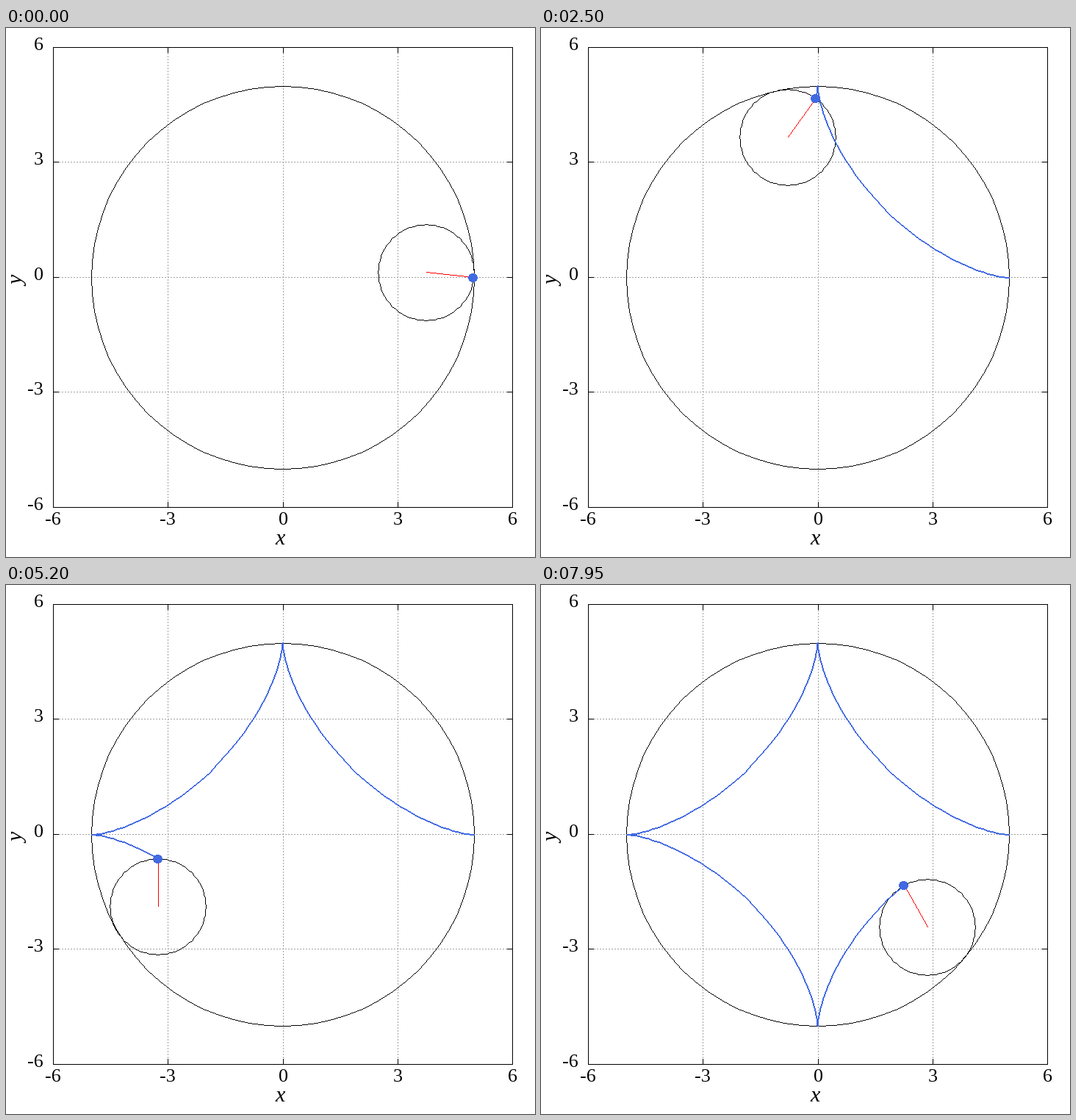
A matplotlib script for the animation above (8 s loop, 720 by 720 pixels).

```python
import numpy as np
import matplotlib.pyplot as plt
from matplotlib.animation import FuncAnimation
from matplotlib.collections import PolyCollection
from matplotlib.patches import Circle

SIZE = 720
FRAMES, INTERVAL = 160, 50
STEP = 2                      # degrees per frame
R_BIG, R_SMALL = 5.0, 1.25
ARM = R_BIG - R_SMALL
LEFT, TOP, RIGHT, BOTTOM = 64, 26, 689, 652
SX, SY = (RIGHT - LEFT) / 12, (BOTTOM - TOP) / 12
TICK = 7
BLUE = "#4169e1"
SQUARE = np.array([(0, 0), (1, 0), (1, 1), (0, 1)])
RIM = np.radians(np.arange(0, 361, 5))

fig = plt.figure(figsize=(SIZE / 72, SIZE / 72), dpi=72, facecolor="white")
ax = fig.add_axes([0, 0, 1, 1])
ax.set_xlim(0, SIZE)
ax.set_ylim(SIZE, 0)
ax.axis("off")


def to_px(x, y):
    """Nearest pixel of a data point."""
    px = np.floor(LEFT + (np.asarray(x) + 6) * SX + 0.5)
    py = np.ceil(BOTTOM - (np.asarray(y) + 6) * SY - 0.5)
    return px, py


def cells(x, y, thick=False):
    """Pixels along a polyline; thick ones are doubled across their run."""
    found = []
    for x1, y1, x2, y2 in zip(x, y, x[1:], y[1:]):
        dx, dy = abs(x2 - x1), abs(y2 - y1)
        n = int(max(dx, dy)) + 1
        run = np.column_stack([np.linspace(x1, x2, n), np.linspace(y1, y2, n)])
        run = np.floor(run + 0.5)
        found.append(run)
        if thick:
            found.append(run + ((0, 1) if dx > dy else (-1, 0)))
    return np.unique(np.concatenate(found), axis=0)


def squares(points):
    return points[:, None, :] + SQUARE


def rim(x, y, r):
    cx, cy = to_px(x, y)
    return squares(cells(np.floor(cx + r * SX * np.cos(RIM)),
                         np.ceil(cy - r * SX * np.sin(RIM))))


def pixel_art(color, zorder, verts=()):
    art = PolyCollection(verts, facecolors=color, edgecolors="none",
                         antialiaseds=False, zorder=zorder)
    ax.add_collection(art, autolim=False)
    return art


def rule(x1, y1, x2, y2):
    pixel_art("black", 2, squares(cells((x1, x2), (y1, y2))))


def dotted(x1, y1, x2, y2):
    run = cells((x1, x2), (y1, y2))
    on = np.arange(len(run)) % 4 < 2
    pixel_art("#a0a0a0", 1, squares(run[on]))


def label(x, y, text, size=26, ha="center", **kw):
    ax.text(x, y, text, family="Liberation Serif", fontsize=size, ha=ha,
            va="baseline", color="black", **kw)


def hypocycloid(deg):
    t = np.radians(deg)
    return (ARM * np.cos(t) + R_SMALL * np.cos(3 * t),
            ARM * np.sin(t) - R_SMALL * np.sin(3 * t))


for value in range(-6, 7, 3):
    px, py = to_px(value, value)
    if abs(value) < 6:
        dotted(px, TOP, px, BOTTOM)
        dotted(LEFT, py, RIGHT, py)
        for a, b in ((TOP, TOP + TICK), (BOTTOM - TICK, BOTTOM)):
            rule(px, a, px, b)
        for a, b in ((LEFT, LEFT + TICK), (RIGHT - TICK, RIGHT)):
            rule(a, py, b, py)
    label(px + (0.5 if value >= 0 else -0.5), 675.5, str(value))
    label(51, py + 4, str(value), ha="right")

for y in (TOP, BOTTOM):
    rule(LEFT, y, RIGHT, y)
for x in (LEFT, RIGHT):
    rule(x, TOP, x, BOTTOM)

label(373.5, 703, "x", size=30, style="italic")
label(24, 344, "y", size=30, style="italic", rotation=90, rotation_mode="anchor")

pixel_art("black", 3, rim(0, 0, R_BIG))
wheel = pixel_art("black", 4)
spoke = pixel_art("red", 5)
trace = pixel_art(BLUE, 6)
dot = ax.add_patch(Circle((0, 0), 5.6, facecolor=BLUE, edgecolor="none",
                          antialiased=False, zorder=7))


def draw(i):
    deg = STEP * (i + 1)
    t = np.radians(deg)
    hub = ARM * np.cos(t), ARM * np.sin(t)
    tip = hypocycloid(deg)
    wheel.set_verts(rim(*hub, R_SMALL))
    spoke.set_verts(squares(cells(*to_px(*np.transpose([hub, tip])))))
    path = to_px(*hypocycloid(np.arange(0, deg + 1, STEP)))
    trace.set_verts(squares(cells(*path, thick=True)))
    px, py = to_px(*tip)
    dot.center = px - 0.5, py + 1
    return wheel, spoke, trace, dot


anim = FuncAnimation(fig, draw, frames=FRAMES, interval=INTERVAL,
                     init_func=lambda: draw(0), repeat=True, repeat_delay=0)
plt.show()
```
